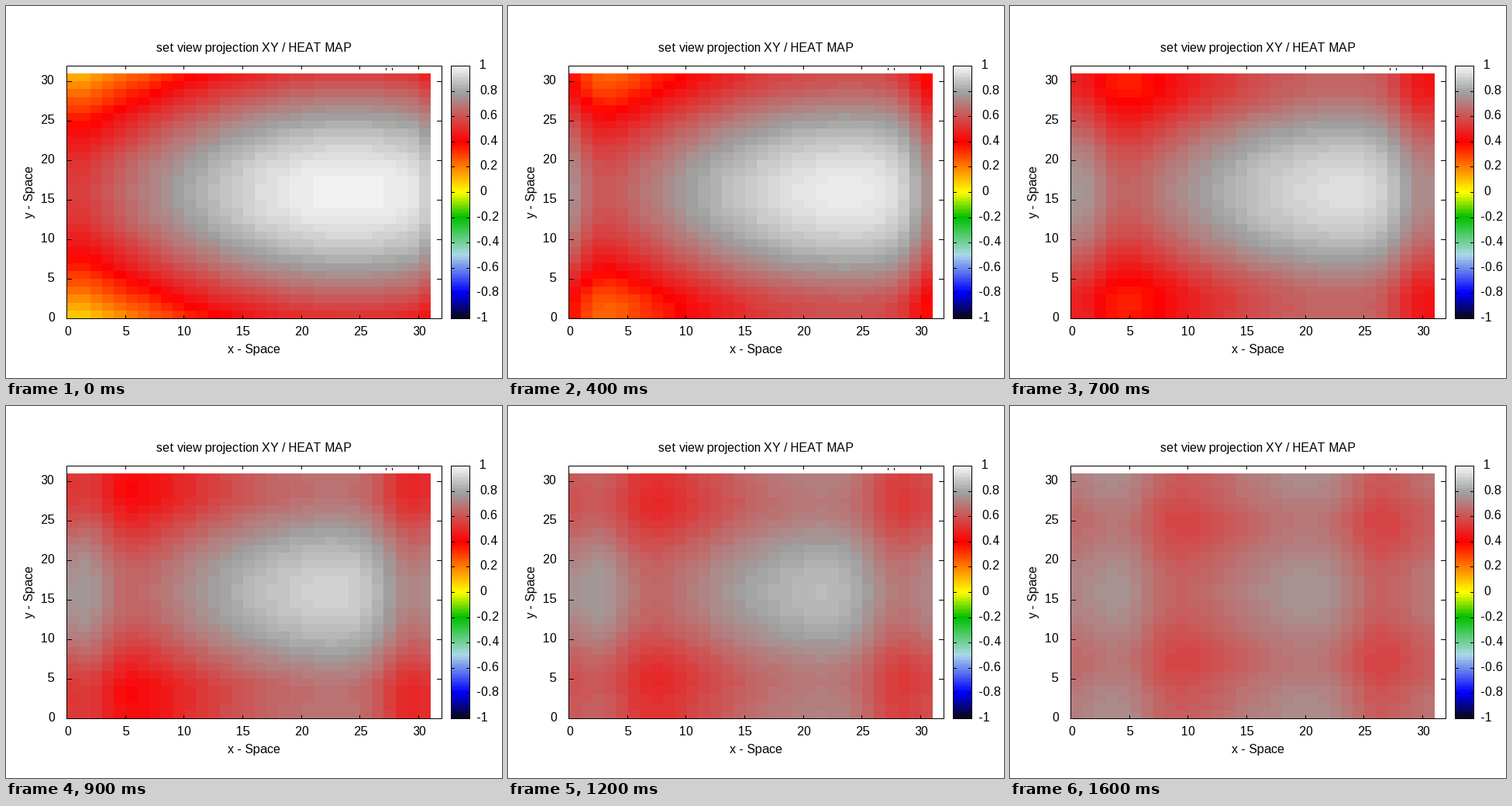
Animation, 640 px wide and 480 px high, one loop 1700 ms. Source, as a matplotlib script:

```python
import numpy as np
import matplotlib.pyplot as plt
from matplotlib.animation import FuncAnimation
from matplotlib.colors import LinearSegmentedColormap
from matplotlib.patches import Rectangle

W, H, DPI = 640, 480, 100
N, FRAMES = 32, 17
LEFT, RIGHT, TOP, BOTTOM = 78.5, 562.5, 77.5, 403.5
BAR_LEFT, BAR_RIGHT = 574.5, 598.5
COURANT2 = 0.21

STOPS = [(-1, "#080820"), (-0.8, "#0000ff"), (-0.5, "#add8e6"),
         (-0.2, "#00c000"), (0, "#ffff00"), (0.4, "#ff0000"),
         (0.8, "#a0a0a0"), (1, "#f2f2f2")]
palette = LinearSegmentedColormap.from_list(
    "heat", [((v + 1) / 2, c) for v, c in STOPS], N=128)

plt.rcParams["font.family"] = "Liberation Sans"
plt.rcParams["font.size"] = 16 * 72 / DPI
plt.rcParams["text.hinting_factor"] = 1  # whole-pixel letter advances


def evolve(start):
    """Periodic 1D wave equation, implicit in time, starting at rest."""
    eye = np.eye(N)
    lap = np.roll(eye, 1, 0) + np.roll(eye, -1, 0) - 2 * eye
    step = np.linalg.inv(eye - COURANT2 * lap)
    old, now, states = start, start, []
    for _ in range(FRAMES):
        old, now = now, step @ (2 * now - old)
        states.append(now)
    return states


def midpoints(v):
    return (v[1:] + v[:-1]) / 2


# The wave is linear and the start is a sum, so x and y evolve separately.
index = np.arange(N)
waves_x = evolve(0.5 * np.sin(np.pi * index / 48))
waves_y = evolve(0.5 * np.sin(np.pi * index / 32))


def field(i):
    return midpoints(waves_y[i])[:, None] + midpoints(waves_x[i])[None, :]


fig = plt.figure(figsize=(W / DPI, H / DPI), dpi=DPI, facecolor="white")
ax = fig.add_axes([0, 0, 1, 1])
ax.axis("off")


def line(x0, y0, x1, y1):
    """One-pixel straight line between two pixel centres."""
    corner = (min(x0, x1) - 0.5, min(y0, y1) - 0.5)
    ax.add_patch(Rectangle(corner, abs(x1 - x0) + 1, abs(y1 - y0) + 1,
                           color="black", lw=0, antialiased=False, zorder=3))


def box(x0, y0, x1, y1):
    line(x0, y0, x1, y0)
    line(x0, y1, x1, y1)
    line(x0, y0, x0, y1)
    line(x1, y0, x1, y1)


def label(x, y, text, ha="center", **kw):
    ax.text(x, y, text, ha=ha, va="baseline", color="black", **kw)


def image(data, extent):
    return ax.imshow(data, cmap=palette, vmin=-1, vmax=1, origin="lower",
                     extent=extent, aspect="auto", interpolation="nearest",
                     zorder=2)


heat = image(field(0), (79, 548, 403, 87))
image(np.linspace(-0.999, 0.999, 128)[:, None], (575, 598, 403, 78))

box(LEFT, TOP, RIGHT, BOTTOM)
box(BAR_LEFT, TOP, BAR_RIGHT, BOTTOM)

for v in range(0, 31, 5):
    x = np.floor(LEFT + v * (RIGHT - LEFT) / N) + 0.5
    y = np.floor(BOTTOM - v * (BOTTOM - TOP) / N) + 0.5
    line(x, BOTTOM, x, BOTTOM - 4)
    line(x, TOP, x, TOP + 4)
    line(LEFT, y, LEFT + 6, y)
    line(RIGHT, y, RIGHT - 6, y)
    label(x + 1, 425, str(v))
    label(63, y + 3.5, str(v), ha="right")

for k in range(-5, 6):
    y = np.floor((TOP + BOTTOM) / 2 - k / 5 * (BOTTOM - TOP) / 2) + 0.5
    line(BAR_LEFT, y, BAR_LEFT + 4, y)
    line(BAR_RIGHT, y, BAR_RIGHT - 4, y)
    label(607 if k < 0 else 611, y + 3.5, f"{k / 5:g}", ha="left")

label(320.5, 59, "set view projection XY / HEAT MAP")
label(319.5, 448, "x - Space")
label(35.5, 240, "y - Space", rotation=90, rotation_mode="anchor")

# Quote marks of the blank legend entry
for x in (490.5, 498.5):
    line(x, 80.5, x, 82.5)

ax.set_xlim(0, W)
ax.set_ylim(H, 0)


def update(i):
    heat.set_data(field(i))
    return [heat]


anim = FuncAnimation(fig, update, frames=FRAMES, interval=100,
                     repeat=True, repeat_delay=0)
plt.show()
```
